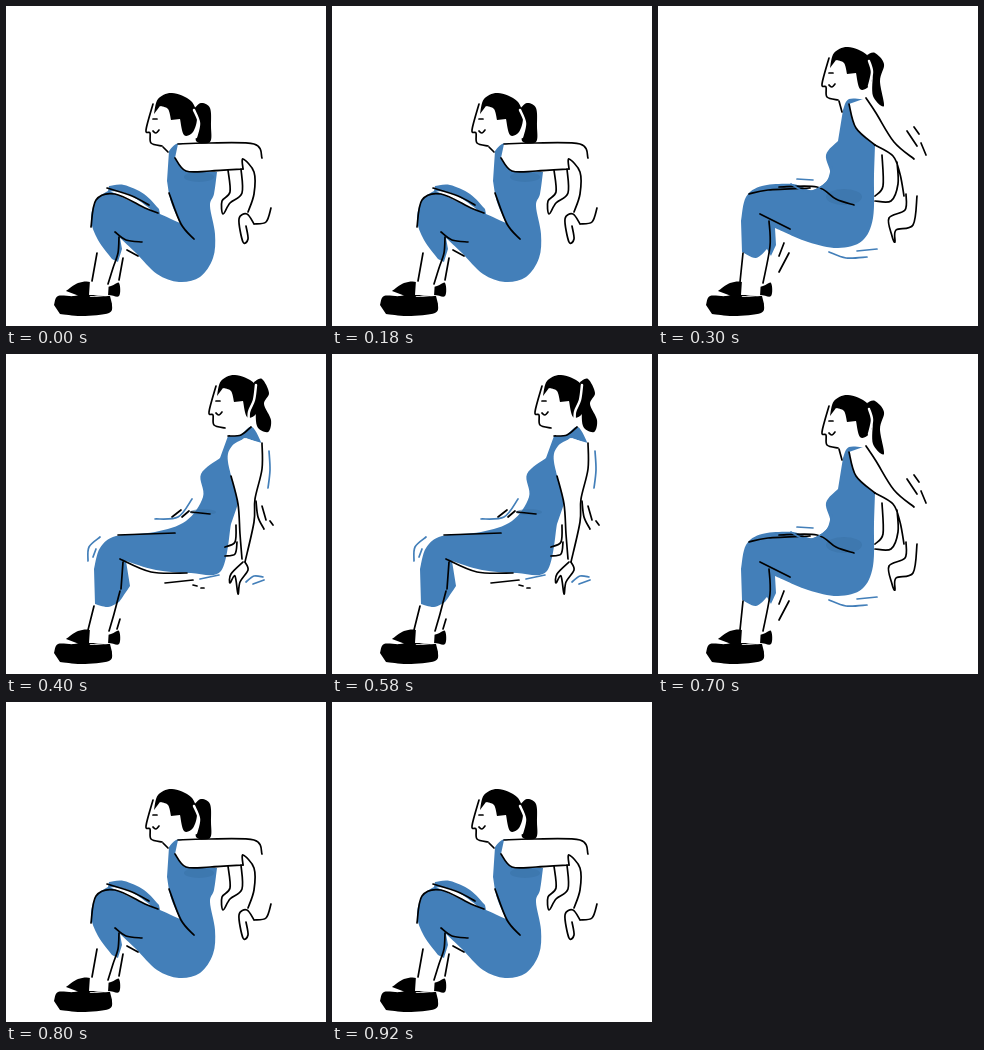
These frames come from a looping animation (320x320 px, 1 s). An HTML page:

```html
<!DOCTYPE html>
<html lang="en">
<head>
<meta charset="utf-8">
<title>Chair dips</title>
<style>
  html, body { margin: 0; height: 100%; overflow: hidden; background: #fff; }
  svg { display: block; width: 100%; height: 100%; }
  path { fill: none; stroke: #000; stroke-width: 1.7; stroke-linecap: round; stroke-linejoin: round; }
  .cloth { fill: #437fb9; stroke: none; }
  .skin { fill: #fff; stroke: none; }
  .dark { fill: #000; stroke: none; }
  .gap { stroke: #fff; stroke-width: 2.5; }
  .swish { stroke: #437fb9; }
  ellipse { fill: #3b73a9; opacity: .6; }
</style>
</head>
<body>
<svg id="stage" viewBox="0 0 320 320"></svg>
<script>
  const stage = document.getElementById("stage");
  let group;

  function add(tag, attrs, parent = group) {
    const el = document.createElementNS("http://www.w3.org/2000/svg", tag);
    for (const name in attrs) el.setAttribute(name, attrs[name]);
    return parent.appendChild(el);
  }

  // Smooth curve through the points of one run.
  function curve(run, start) {
    const pts = run.trim().split(" ").map(p => p.split(",").map(Number));
    const at = i => pts[Math.max(0, Math.min(pts.length - 1, i))];
    let d = start + pts[0];
    for (let i = 0; i < pts.length - 1; i++) {
      const [a, b, c, e] = [at(i - 1), at(i), at(i + 1), at(i + 2)];
      d += "C" + [0, 1].map(k => b[k] + (c[k] - a[k]) / 6)
         + " " + [0, 1].map(k => c[k] - (e[k] - b[k]) / 6) + " " + c;
    }
    return d;
  }

  // A bar parts runs: separate strokes in a line, corners in a fill.
  const trace = (text, join) =>
    text.split("|").map((run, i) => curve(run, i ? join : "M")).join("");
  const line = (text, cls = "") => add("path", { d: trace(text, "M"), class: cls });
  const fill = (cls, text) => add("path", { d: trace(text, "L") + "Z", class: cls });
  const shade = (cx, cy, rx, ry) => add("ellipse", { cx, cy, rx, ry });

  function limb(outer, inner, cap = "") {
    fill("skin", outer + "|" + inner + (cap && "|" + cap));
    line(outer + "|" + inner);
  }

  function head(x, y, tail, gap) {
    const body = group;
    fill("dark", tail);
    group = add("g", { transform: `translate(${x} ${y})` });
    fill("dark", "172,62 176,47 190,41 209,49 215,65 211,80 202,83 198,67 | 189,68 186,57 178,54");
    line("171,52 164,78 168,81 169,91 180,94 | 171,67 175,67 | 171,79 174,81 177,78");
    group = body;
    line(gap, "gap");
  }

  function shoes() {
    fill("dark", "60,285 72,277 84,276 86,284 105,280 113,277 113,290 101,289 76,291");
    fill("skin", "84,274 103,274 | 102,290 83,289");
    fill("dark", "48,299 52,290 68,290 82,286 | 84,291 104,290 | 106,298 103,307 76,310 54,308");
  }

  function low() {
    fill("cloth", "163,145 170,138 180,137 | 186,163 211,166 | 211,166 208,188 204,200 209,228 207,252 194,271 173,276 151,268 130,247 114,232 | 116,243 112,256 | 106,253 92,234 85,214 90,194 102,185 | 103,180 118,179 138,188 153,203 | 154,208 174,217 | 174,217 165,196 161,175");
    shade(193, 171, 15, 5);
    fill("skin", "104,185 122,188 145,204 120,193");
    limb("172,138 200,137 248,138 256,152", "237,163 204,165 180,165 169,152");
    head(-24, 46, "187,104 195,97 204,102 205,120 204,136 190,135 194,118", "188,104 193,117 190,131");
    line("157,141 162,146 | 237,163 237,153 248,166 248,188 242,206 | 222,164 224,186 216,195 217,208 224,197 236,187 235,163");
    line("265,202 260,216 248,218 | 248,218 241,208 233,213 237,236 242,233 240,220");
    line("85,221 90,194 109,188 139,202 152,207 | 101,182 126,190 143,199 | 163,187 175,218 188,233 | 109,226 120,234 136,236");
    shoes();
    line("91,247 86,275 | 113,231 112,247 107,262 102,278 | 117,252 113,274 | 121,244 132,250");
  }

  function mid() {
    fill("cloth", "185,104 191,93 210,94 | 195,104 201,124 217,139 | 217,139 216,170 215,212 204,235 180,242 150,236 117,222 | 118,239 113,250 | 109,243 98,252 84,246 | 83,215 88,191 104,180 135,178 155,184 172,170 168,149 180,135");
    shade(186, 191, 18, 8);
    limb("208,92 218,107 236,136 256,153", "217,139 198,122 191,98");
    head(0, 0, "209,49 217,47 226,58 222,75 226,100 215,90 215,68", "211,55 214,66 211,80");
    line("181,95 184,106 | 217,139 235,150 242,168 246,190 | 224,149 225,180 217,190 | 239,156 240,178 233,195 217,195");
    line("248,188 247,204 231,212 234,230 237,236 238,224 255,219 259,190");
    line("91,188 110,184 152,182 | 121,181 159,181 178,193 196,199 | 102,208 132,223");
    shoes();
    line("85,247 82,276 | 111,215 112,240 105,277 | 126,237 121,250 | 131,247 121,266");
    line("256,121 261,128 | 249,125 259,140 | 263,137 268,149");
    line("133,178 150,186 169,176 174,160 | 139,173 155,174 | 171,246 188,252 209,251 | 199,245 219,243", "swish");
  }

  function high() {
    fill("cloth", "222,82 234,81 246,73 256,90 | 240,84 226,92 222,108 233,147 | 225,170 215,217 185,219 150,216 120,207 | 124,232 116,244 | 113,248 102,253 89,250 | 88,215 94,194 110,182 149,178 180,167 197,143 195,120 214,104");
    shade(197, 158, 13, 3);
    limb("256,89 256,115 249,145 248,168 239,208", "236,205 234,180 232,150 225,122", "223,98 238,84");
    head(39, -20, "248,28 256,25 263,39 258,50 265,66 262,78 251,72 250,50", "250,31 248,46 243,58 243,70");
    line("230,171 229,188 219,193 | 231,188 229,200 219,202 | 237,208 225,220 224,229 229,222 232,240 234,228 242,216 239,208");
    line("222,82 235,81 245,73 | 112,181 169,179 | 185,158 204,160 | 114,205 145,218 181,219 | 117,208 115,235");
    shoes();
    line("88,252 82,276 | 114,237 108,260 103,277 | 114,265 111,275");
    line("250,147 252,163 258,175 | 256,152 260,166 | 264,167 267,171 | 166,163 175,156 | 176,163 183,157 | 159,229 187,226 | 187,231 191,232 | 195,234 198,234");
    line("263,97 264,116 262,134 | 149,165 172,163 186,145 | 82,207 83,193 94,183 | 87,203 90,195 | 194,225 213,221 | 240,228 248,222 257,223 | 247,230 258,226", "swish");
  }

  const poses = [low, mid, high].map(build => {
    const pose = group = add("g", {}, stage);
    build();
    return pose;
  });

  // Down, halfway, up, halfway, down: each pose switches with a hard cut.
  function poseAt(t) {
    if (t < 300 || t >= 800) return 0;
    return t >= 400 && t < 700 ? 2 : 1;
  }

  function draw(now) {
    const current = poseAt(now % 1000);
    poses.forEach((g, i) => g.style.display = i === current ? "" : "none");
    requestAnimationFrame(draw);
  }

  draw(0);
</script>
</body>
</html>
```
